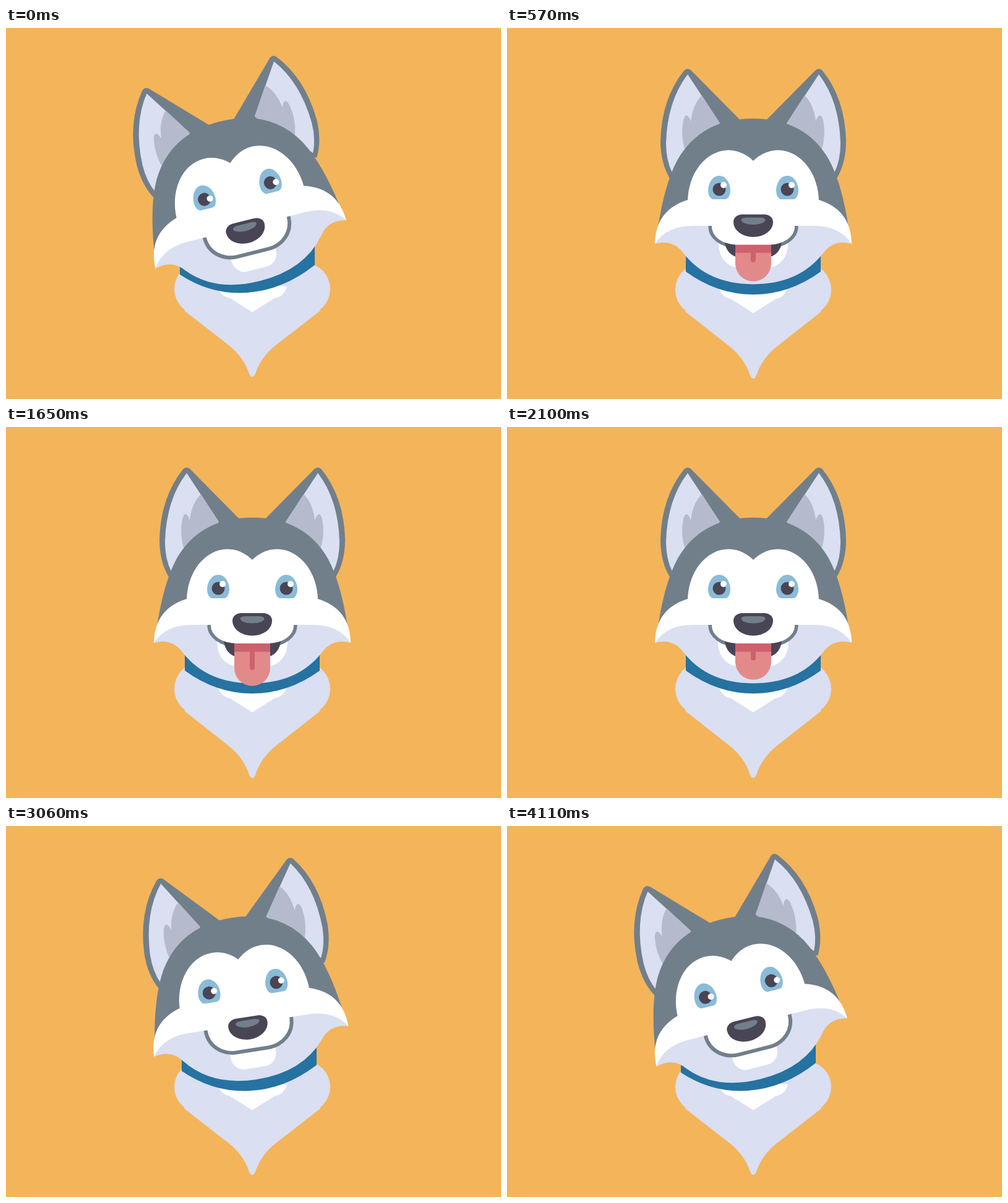
These frames come from a looping animation (800 by 600 pixels, 4.17 s). An HTML page with a canvas:

```html
<!DOCTYPE html>
<html lang="en">
<head>
<meta charset="utf-8">
<title>Husky</title>
<style>
  html, body { margin: 0; width: 100%; height: 100%; overflow: hidden; background: #f4b45a; }
  canvas { display: block; width: 800px; height: 600px; }
</style>
</head>
<body>
<canvas id="stage" width="800" height="600"></canvas>
<script>
const ctx = document.getElementById('stage').getContext('2d');
const LOOP = 4170, STEP = 30, CX = 398, PIVOT = 350;
const TILT = -14.17 * Math.PI / 180;
const C = {
  bg: '#f4b45a', gray: '#717f8b', lilac: '#dadff2', inner: '#b5bbcd', white: '#fff',
  blue: '#2672a0', iris: '#8abbd8', dark: '#4a4555', tongue: '#e28a8a', rose: '#cc626d'
};

// All x values are relative to the middle of the dog.
// sym: a closed shape from its right half (2 numbers = line, 4 = curve).
function sym(...half) {
  const p = new Path2D();
  const end = i => half[i].slice(-2);
  p.moveTo(...half[0]);
  for (const s of half.slice(1)) s.length > 2 ? p.quadraticCurveTo(...s) : p.lineTo(...s);
  const last = half.length - 1;
  p.lineTo(-end(last)[0], end(last)[1]);
  for (let i = last; i > 0; i--) {
    const [x, y] = end(i - 1), [cx, cy] = half[i];
    half[i].length > 2 ? p.quadraticCurveTo(-cx, cy, -x, y) : p.lineTo(-x, y);
  }
  p.closePath();
  return p;
}

// pill: a box of half width w with oval corners, at the bottom and optionally the top.
function pill(w, top, bottom, rx = w, ry = rx, tx = 0, ty = tx) {
  const p = new Path2D(), up = { x: tx, y: ty }, low = { x: rx, y: ry };
  p.roundRect(-w, top, 2 * w, bottom - top, [up, up, low, low]);
  return p;
}

function oval(x, y, rx, ry = rx, from = 0) {
  const p = new Path2D();
  p.ellipse(x, y, rx, ry, 0, from, 2 * Math.PI);
  return p;
}

const taper = sym([0, 400], [84, 400], [110, 457], [38, 513], [14, 532, 5, 559], [3, 564, 0, 564]);
const chest = sym([0, 410], [56, 418], [52, 434, 36, 437], [4, 457], [0, 460, 0, 459]);
const collar = sym([0, 350], [109, 350], [109, 392], [58, 429, 0, 429]);
const skull = sym([0, 146], [84, 146, 122, 212], [143, 250, 154, 322], [0, 322]);
const cheek = sym([0, 280], [106, 280], [158, 296, 159, 351], [140, 322, 98, 322], [0, 322]);
const ear = new Path2D('M20 148L100 67Q106 61 112 67Q148 112 150 180Q150 216 135 241L60 200Z');
const earIn = new Path2D('M106 73L54 152L131 232Q141 212 141 184Q139 116 106 73Z');
const earFur = new Path2D('M83 107Q98 122 101 149Q108 131 113 147Q118 172 110 197L90 200L54 152Z');

function ramp(t, from, to) {
  const p = Math.min(1, Math.max(0, (t - from) / (to - from))) ** 0.6;
  return p * p * (3 - 2 * p);
}
const pulse = (t, a, b, c, d) => ramp(t, a, b) - ramp(t, c, d);

function fill(path, color) {
  ctx.fillStyle = color;
  ctx.fill(path);
}
function group(draw, ...steps) {
  ctx.save();
  for (const [name, ...args] of steps) ctx[name](...args);
  draw();
  ctx.restore();
}
const moved = (x, y, draw) => group(draw, ['translate', x, y]);
function pair(draw) {
  draw();
  group(draw, ['scale', -1, 1]);
}

function pose(t) {
  const phase = 2 * Math.PI * (t - 1050) / 300;
  const open = pulse(t, 150, 680, 2180, 2620);
  const arc = Math.sin(Math.PI * Math.min(1, Math.max(0, (t - 2820) / 580)));
  return {
    open, arc,
    nod: open + arc,
    tilt: 1 - ramp(t, 0, 560) + ramp(t, 2820, 3400),
    lick: pulse(t, 100, 560, 2200, 2560),
    pant: Math.cos(phase),
    bob: Math.sin(phase) * open
  };
}

function drawTorso({ open, bob, tilt }) {
  group(() => {
    pair(() => fill(oval(84, 422, 42), C.lilac));
    fill(taper, C.lilac);
    fill(chest, C.white);
  }, ['translate', 0, 325], ['scale', 1, 1 + 0.015 * open - 0.004 * bob], ['translate', 0, -325]);
  group(() => fill(collar, C.blue),
    ['transform', 1, -0.07 * tilt, 0, 1, -8 * tilt, 2 * open - tilt]);
}

function drawTongue({ lick, pant }) {
  const lip = new Path2D();
  lip.rect(-60, 330, 120, 130);
  group(() => {
    fill(pill(29, 325, 413.7 + 5 * pant), C.tongue);
    fill(pill(29, 325, 363.5, 0), C.rose);
    fill(pill(4, 325, 385.2 + 7.8 * pant), C.rose);
  }, ['clip', lip], ['translate', 0, -68 * (1 - lick)]);
}

function drawMouth(s) {
  const k = s.open, mix = (a, b) => a + (b - a) * k;
  const top = 322 - 2 * s.nod, bottom = 365 - 10 * k - 2 * s.nod;
  const muzzle = (inset, rise) => pill(70 - inset, top - rise, bottom - inset,
    44 - inset, 0.95 * (bottom - top) - inset);

  fill(pill(mix(37, 57), 340, mix(392, 387), mix(20, 32), mix(22, 38)), C.white);
  fill(muzzle(k / 2 - 3, 0), C.gray);
  fill(pill(46, 344, 344 + 28 * k, 24, 28 * k), C.dark);
  if (s.lick > 0) drawTongue(s);
  fill(muzzle(3, 3), C.white);
}

function drawEyes({ tilt, nod }) {
  for (const x of [-55, 55]) moved(x, -nod, () => {
    fill(pill(18, 239 + nod, 278, 9, 14, 18, 25), C.iris);
    fill(oval(0, 262, 10.5), C.dark);
    fill(oval(7 + 2 * tilt, 255 + 8 * tilt, 5), C.white);
  });
}

function drawHead(s) {
  const { tilt, open, arc, nod } = s;
  // Shifts are in stage space, so they come before the rotation.
  const turned = (x, y, draw) => group(draw,
    ['translate', x, PIVOT + y], ['rotate', TILT * tilt], ['translate', 0, -PIVOT]);

  turned(0, 1.5 * (nod - tilt) + 0.8 * s.bob, () => pair(() => {
    fill(ear, C.gray);
    fill(earIn, C.lilac);
    fill(earFur, C.inner);
  }));

  turned(-2.5 * tilt, -tilt, () => {
    const up = 2 * nod, chin = 412 + 2.5 * open - arc;
    moved(0, 0.6 * nod, () => fill(skull, C.gray));
    fill(sym([0, 310], [98, 312 - up], [150, 336 - up], [159, 351 - up],
      [130, 343 - up, 113, 366 - up], [74, chin, 0, chin]), C.lilac);
    moved(0, -0.5 * nod, () => pair(() => fill(oval(40, 282, 66, 84, Math.PI), C.white)));
    moved(0, -up, () => fill(cheek, C.white));
    drawMouth(s);
    drawEyes(s);
  });

  turned(-5 * tilt, -tilt - 3 * arc, () => moved(0, -11 * open, () => {
    fill(pill(32, 312, 348.5, 32, 24, 14, 12), C.dark);
    fill(pill(19.5, 317, 328.5, 19.5, 8, 9, 3.5), C.gray);
  }));
}

const start = performance.now();
function frame() {
  const t = (performance.now() - start) % LOOP;
  const s = pose(t - t % STEP);
  ctx.fillStyle = C.bg;
  ctx.fillRect(0, 0, 800, 600);
  moved(CX, 0, () => {
    drawTorso(s);
    drawHead(s);
  });
  requestAnimationFrame(frame);
}
frame();
</script>
</body>
</html>
```
